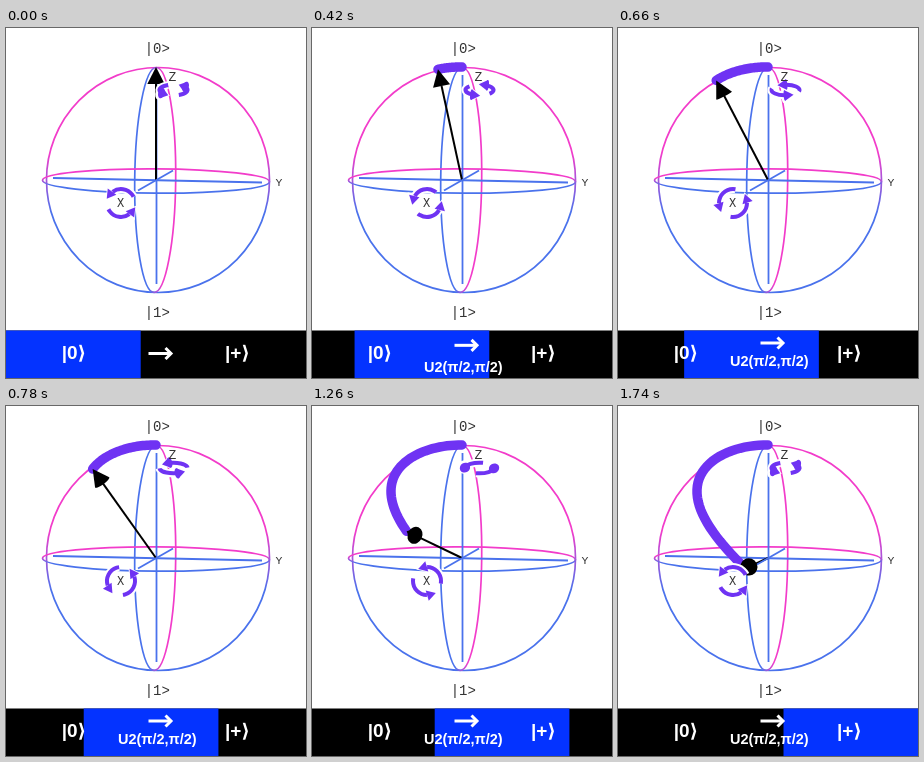
An HTML page with a canvas that plays this animation: 300 px wide and 350 px high, repeating every 3540 ms.

```html
<!DOCTYPE html>
<html lang="en">
<head>
<meta charset="utf-8">
<title>Qubit rotation</title>
<style>
  html, body { margin: 0; width: 100%; height: 100%; overflow: hidden; background: #fff; }
  canvas { display: block; }
</style>
</head>
<body>
<canvas id="stage" width="300" height="350"></canvas>
<script>
const ctx = document.getElementById('stage').getContext('2d');
const LOOP = 3540, STEP = 60, LAST = 29;
const PINK = '#f23cca', BLUE = '#4a72ec', PURPLE = '#6f33f3', BAR = '#0433ff', INK = '#333';
const MONO = '"Liberation Mono", monospace';
const SANS = '"Liberation Sans", "DejaVu Sans", sans-serif';
const CENTER = [150, 152], RADIUS = 113;

// Screen position of a point on the sphere
const project = (x, y, z) => [
  CENTER[0] - 22 * x + 118 * y,
  CENTER[1] + 11 * x + 2 * y - RADIUS * z
];

// The state tilts from the pole while turning about Z by the same angle
const stateAt = a => project(Math.sin(a) ** 2, -Math.sin(a) * Math.cos(a), Math.cos(a));

function stroke(color, width) {
  ctx.strokeStyle = color;
  ctx.lineWidth = width;
  ctx.stroke();
}

function polyline(points, color, width) {
  ctx.beginPath();
  points.forEach(p => ctx.lineTo(...p));
  stroke(color, width);
}

function label(text, x, y, font, color = INK) {
  ctx.font = font;
  ctx.fillStyle = color;
  ctx.fillText(text, x, y);
}

// Ellipse shading from pink to blue between two points
function ring(x, y, rx, ry, tilt, from, to) {
  const shade = ctx.createLinearGradient(...from, ...to);
  shade.addColorStop(0, PINK);
  shade.addColorStop(1, BLUE);
  ctx.beginPath();
  ctx.ellipse(x, y, rx, ry, tilt, 0, 2 * Math.PI);
  stroke(shade, 1.7);
}

function drawSphere() {
  ring(152, 152, 111.5, 112.5, 0, [0, 125], [0, 185]);
  ring(149.2, 152, 20.5, 112.5, 0.01, [156, 0], [143, 0]);
  ring(150, 153, 113.5, 12.2, 0.006, [0, 150], [0, 157]);
  polyline([[47, 150], [256, 154.5]], BLUE, 1.8);
  polyline([[150.5, 47], [150.5, 256]], BLUE, 1.8);
}

function drawTrail(angle) {
  const steps = 40;
  const points = Array.from({ length: steps + 1 }, (_, i) => stateAt(angle * i / steps));
  ctx.lineCap = 'round';
  polyline(points, PURPLE, 9.5);
  ctx.lineCap = 'butt';
}

// Solid cone; (vx, vy) is its unit axis as seen on screen, shorter when it points at the viewer
function cone(tipX, tipY, vx, vy, length, radius, color) {
  const seen = Math.hypot(vx, vy);
  const depth = Math.sqrt(Math.max(0, 1 - seen * seen));
  ctx.save();
  ctx.translate(tipX, tipY);
  ctx.rotate(Math.atan2(vy, vx));
  ctx.fillStyle = color;
  ctx.beginPath();
  ctx.moveTo(0, 0);
  ctx.lineTo(-length * seen, radius);
  ctx.lineTo(-length * seen, -radius);
  ctx.fill();
  ctx.beginPath();
  ctx.ellipse(-length * seen, 0, radius * depth, radius, 0, 0, 2 * Math.PI);
  ctx.fill();
  ctx.restore();
}

function drawVector(angle) {
  const [x, y] = stateAt(angle);
  const vx = (x - CENTER[0]) / RADIUS, vy = (y - CENTER[1]) / RADIUS;
  const length = 17;
  polyline([CENTER, [x - length * vx, y - length * vy]], '#000', 2);
  polyline([[132, 162.5], [167, 142.5]], BLUE, 1.8);
  cone(x, y, vx, vy, length, 8.7, '#000');
}

// Two arrows circling counter-clockwise, with a white margin around them
function drawSpinner(x, y, squash, angle) {
  const r = 14;
  for (const [color, grow] of [['#fff', 2], [PURPLE, 0]]) {
    for (const turn of [angle, angle + Math.PI]) {
      const vx = -Math.sin(turn), vy = -Math.cos(turn) * squash;
      ctx.beginPath();
      ctx.ellipse(x, y, r, r * squash, 0, 0.3 - turn, 2.05 - turn);
      stroke(color, 4 + 2 * grow);
      cone(x + r * Math.cos(turn) + (5 + grow) * vx,
        y - r * squash * Math.sin(turn) + (5 + grow) * vy,
        vx, vy, 9 + 2 * grow, 5.3 + grow, color);
    }
  }
}

function drawFooter(n) {
  const rise = Math.min(1, n / 9);
  const arrowY = 325.5 - 10.5 * rise;
  ctx.fillStyle = '#000';
  ctx.fillRect(0, 302.5, 300, 48);
  ctx.fillStyle = BAR;
  ctx.fillRect(6.2 * n - 0.017 * n * n, 302.5, 134.7, 48);
  label('|0⟩', 68, 331, `bold 19px ${SANS}`, '#fff');
  label('|+⟩', 231.5, 331, `bold 19px ${SANS}`, '#fff');
  polyline([[142.5, arrowY], [165, arrowY]], '#fff', 3);
  polyline([[159.5, arrowY - 5.5], [165, arrowY], [159.5, arrowY + 5.5]], '#fff', 3);
  label('U2(π/2,π/2)', 151.3, 365 - 27 * rise, `bold 14.5px ${SANS}`, '#fff');
}

function draw(now) {
  const n = Math.min(LAST, Math.floor(now % LOOP / STEP));
  const angle = Math.PI / 4 * (1 - Math.cos(Math.PI * n / (LAST + 1)));
  ctx.fillStyle = '#fff';
  ctx.fillRect(0, 0, 300, 350);
  ctx.textAlign = 'center';
  drawSphere();
  if (n > 0) drawTrail(angle);
  drawVector(angle);
  drawSpinner(115, 175, 1, 2 * angle - 0.63);
  drawSpinner(167.5, 62, 0.38, 2 * angle + 0.87);
  label('|0>', 151.3, 25, `14px ${MONO}`);
  label('|1>', 151.3, 289, `14px ${MONO}`);
  label('Z', 166.5, 53, `13px ${MONO}`);
  label('Y', 273, 158, `11.5px ${MONO}`);
  label('X', 114.5, 179, `12px ${MONO}`);
  drawFooter(n);
}

const start = performance.now();
function tick() {
  draw(performance.now() - start);
  requestAnimationFrame(tick);
}
tick();
</script>
</body>
</html>
```
